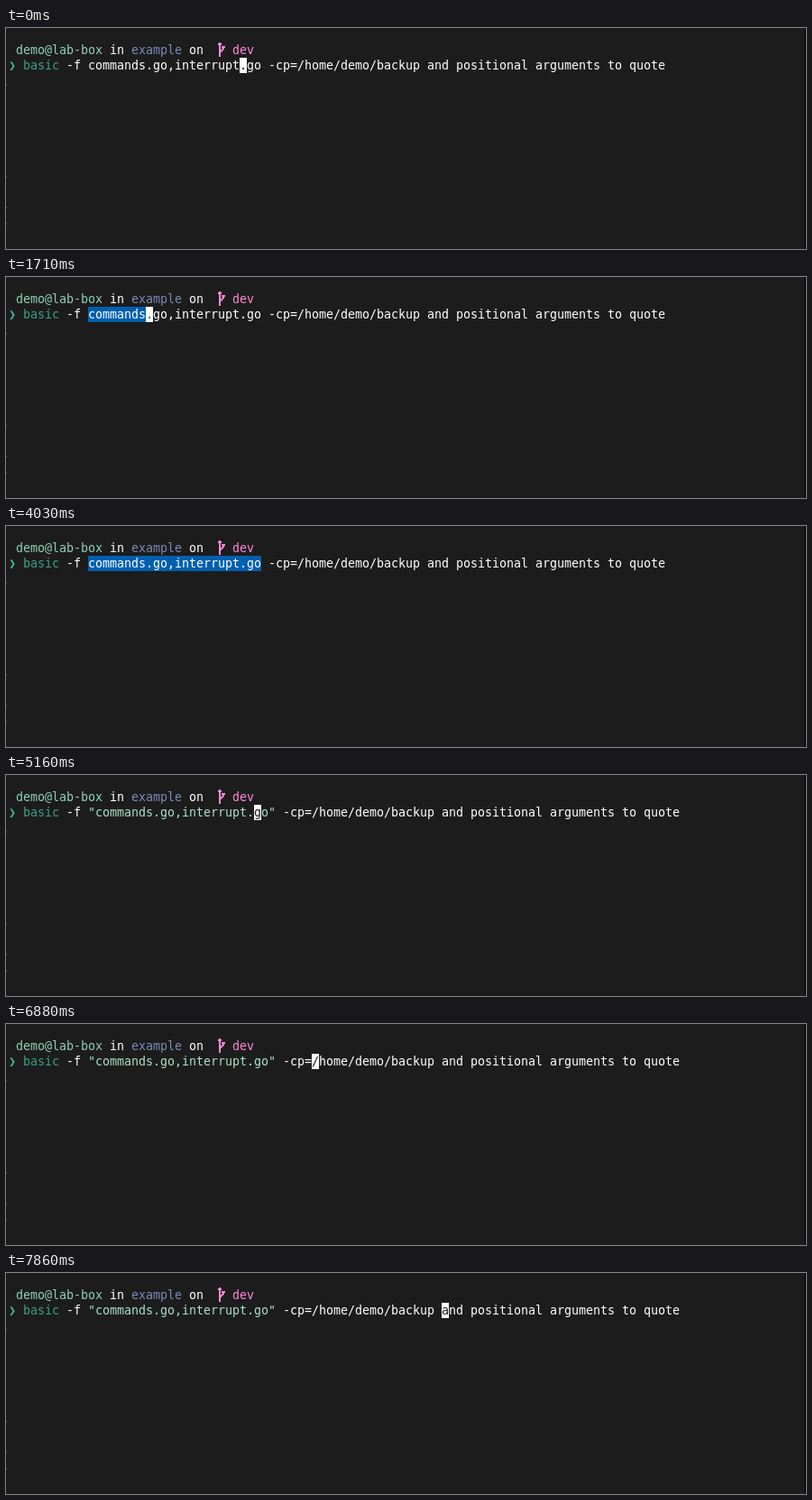
Write an HTML page with a canvas that moves like this. It is 887 by 245 pixels and loops after 7990 ms.

```html
<!DOCTYPE html>
<html lang="en">
<head>
<meta charset="utf-8">
<title>Terminal: selecting and quoting</title>
<style>
  html, body { margin: 0; width: 887px; height: 245px; overflow: hidden; background: #1c1c1c; }
  canvas { display: block; }
</style>
</head>
<body>
<canvas id="stage" width="887" height="245"></canvas>
<script>
const ctx = document.getElementById('stage').getContext('2d');

const LOOP = 7990;
const QUOTE_TIME = 5160;
const ANCHOR = 11;
const CELL = { left: 3, top: 16, w: 8, h: 17, baseline: 13 };
const COLOR = {
  bg: '#1c1c1c', text: '#ffffff', select: '#005faf',
  login: '#8fd0b5', path: '#7a8bb5', branch: '#ff87d7',
  prompt: '#45b99c', command: '#3a9f86', string: '#a8e0c8'
};

// [start time, cursor column, mode]
const steps = [
  [0, 32, 'normal'], [130, 23, 'normal'], [330, 22, 'normal'], [460, 20, 'normal'],
  [660, 19, 'normal'], [920, 11, 'normal'],
  [1450, 11, 'visual'], [1710, 19, 'visual'], [1910, 20, 'visual'], [2040, 22, 'visual'],
  [2440, 23, 'visual'], [3240, 23, 'pending'], [3370, 34, 'visual'],
  [4030, 34, 'pending'], [4560, 34, 'underline'], [4960, 34, 'pending'],
  [QUOTE_TIME, 34, 'normal'], [5960, 33, 'normal'], [6090, 34, 'normal'],
  [6290, 36, 'normal'], [6420, 38, 'normal'], [6620, 39, 'normal'], [6750, 41, 'normal'],
  [6880, 42, 'normal'], [7080, 43, 'normal'], [7210, 47, 'normal'], [7340, 48, 'normal'],
  [7480, 52, 'normal'], [7660, 53, 'normal'], [7860, 60, 'normal']
];

const header = [
  [1, 'demo@lab-box', COLOR.login], [14, 'in', COLOR.text], [17, 'example', COLOR.path],
  [25, 'on', COLOR.text], [31, 'dev', COLOR.branch]
];

const cellX = col => CELL.left + col * CELL.w;
const cellY = row => CELL.top + row * CELL.h;

function rect(x, y, w, h, color) {
  ctx.fillStyle = color;
  ctx.fillRect(x, y, w, h);
}

function drawText(col, row, text, color) {
  ctx.fillStyle = color;
  [...text].forEach((char, i) =>
    ctx.fillText(char, cellX(col + i), cellY(row) + CELL.baseline));
}

function drawBranchIcon() {
  ctx.strokeStyle = COLOR.branch;
  ctx.lineWidth = 2;
  ctx.beginPath();
  ctx.moveTo(237, 16);
  ctx.lineTo(237, 32);
  ctx.moveTo(241, 20);
  ctx.lineTo(241, 23);
  ctx.lineTo(237, 27);
  ctx.stroke();
  rect(235, 17, 4, 2, COLOR.branch);
  rect(239, 20, 4, 2, COLOR.branch);
}

function drawEdges() {
  rect(0, 0, 1, 245, '#151515');
  rect(885, 0, 2, 245, '#0c0c0c');
  for (const y of [62, 164, 198, 216]) rect(0, y, 1, 2, '#484848');
}

function commandLine(quoted) {
  const files = 'commands.go,interrupt.go';
  const rest = ' -cp=/home/demo/backup and positional arguments to quote';
  return [
    ['❯ ', COLOR.prompt], ['basic', COLOR.command], [' -f ', COLOR.text],
    quoted ? [`"${files}"`, COLOR.string] : [files, COLOR.text],
    [rest, COLOR.text]
  ];
}

function draw(time) {
  const [, cursor, mode] = steps.findLast(([start]) => start <= time);
  const spans = commandLine(time >= QUOTE_TIME);
  const line = spans.map(([text]) => text).join('');
  const x = cellX(cursor), y = cellY(1);

  rect(0, 0, 887, 245, COLOR.bg);
  drawEdges();
  for (const [col, text, color] of header) drawText(col, 0, text, color);
  drawBranchIcon();

  const selecting = mode !== 'normal';
  if (selecting) {
    rect(cellX(ANCHOR), y, (cursor - ANCHOR + 1) * CELL.w, CELL.h, COLOR.select);
  }

  let col = 0;
  for (const [text, color] of spans) {
    drawText(col, 1, text, color);
    col += text.length;
  }

  if (mode === 'normal' || mode === 'visual') {
    rect(x, y, CELL.w, CELL.h, COLOR.text);
    drawText(cursor, 1, line[cursor], selecting ? COLOR.select : COLOR.bg);
  } else if (mode === 'underline') {
    rect(x, y + CELL.h - 2, CELL.w, 2, COLOR.text);
  }
}

ctx.font = '13.333px "DejaVu Sans Mono", "DejaVu Sans", monospace';
ctx.textBaseline = 'alphabetic';

const begin = performance.now();
function tick() {
  draw((performance.now() - begin) % LOOP);
  requestAnimationFrame(tick);
}
tick();
</script>
</body>
</html>
```
